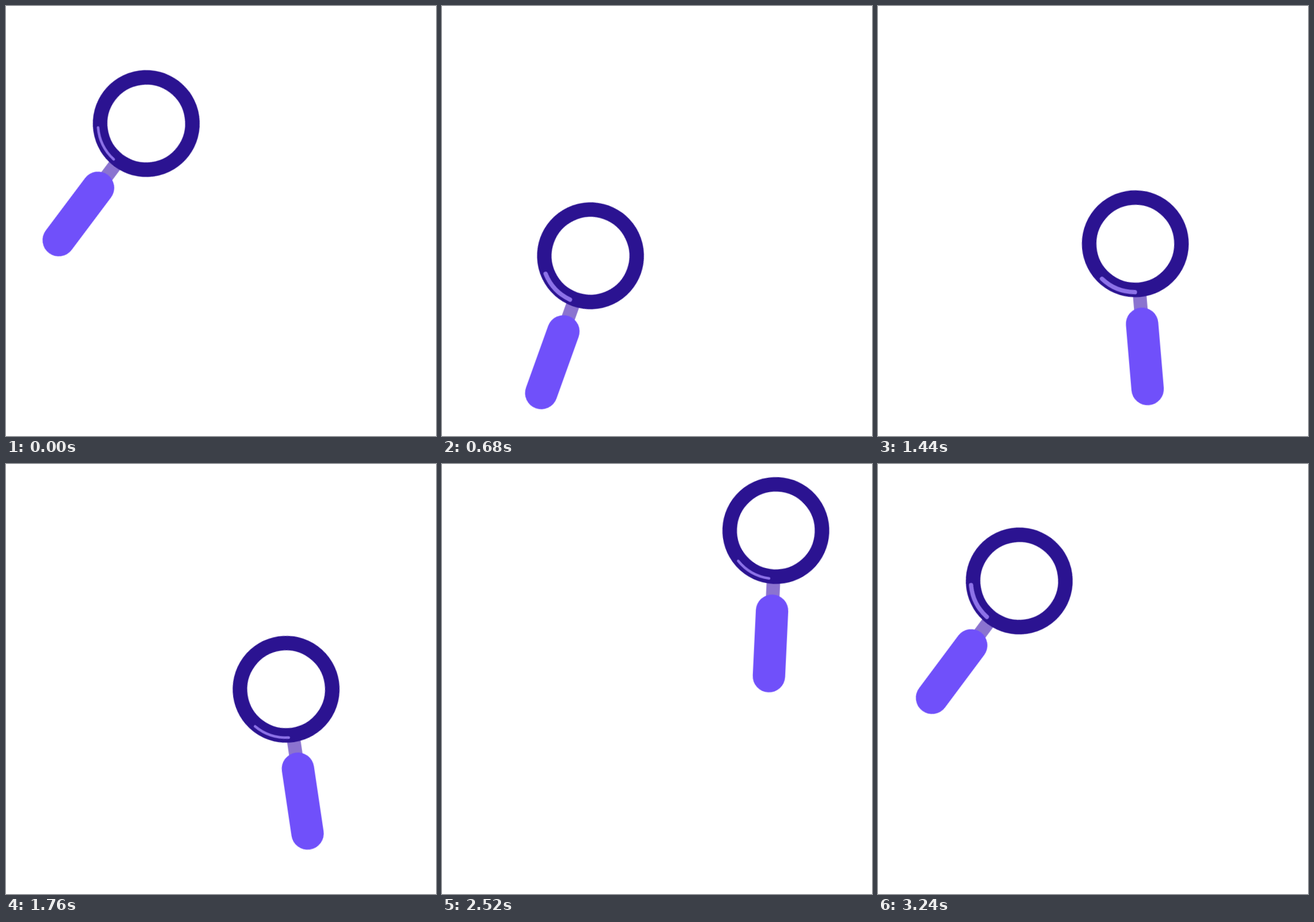
Animation of 748x748 px, one loop 3.32 s. Source, as an HTML page without scripts:

```html
<!DOCTYPE html>
<html lang="en">
<head>
<meta charset="utf-8">
<title>Magnifying glass</title>
<style>
  html, body { margin: 0; width: 100%; height: 100%; overflow: hidden; background: #fff; }
  svg { display: block; width: 100%; height: 100%; }

  /* The lens centre travels round four stops, with a short rest at each */
  .glass {
    offset-path: path("M244 204.5C234 287 244 371 262.5 454L482.5 406L581 115C469 145 356 137 244 204.5");
    offset-rotate: 0deg;
    animation: travel 3.32s cubic-bezier(.33, 0, .67, 1) infinite;
  }
  @keyframes travel {
    0%, 1.2% { offset-distance: 0%; animation-timing-function: cubic-bezier(.24, 0, .61, 1); }
    25.3%, 26.3% { offset-distance: 22.14%; }
    49.1%, 49.7% { offset-distance: 41.97%; }
    74.6%, 75.9% { offset-distance: 69.01%; }
    98.6%, 100% { offset-distance: 100%; }
  }

  /* The handle swings under the lens */
  .swing { animation: swing 3.32s linear infinite; }
  @keyframes swing {
    0%, 1.2% { transform: rotate(36.9deg); }
    26.3% { transform: rotate(14.6deg); animation-timing-function: cubic-bezier(.45, .38, .68, 1); }
    50.6% { transform: rotate(-8.8deg); animation-timing-function: cubic-bezier(.4, .1, .7, .5); }
    75.9% { transform: rotate(2.7deg); animation-timing-function: cubic-bezier(.33, .1, .67, 1); }
    98.6%, 100% { transform: rotate(36.9deg); }
  }

  .neck { fill: #8b73d0; }
  .handle { fill: #7050fa; }
  .ring { fill: none; stroke: #2b1391; stroke-width: 25.3; }
  .shine {
    fill: none; stroke: #8d72e8; stroke-linecap: round;
    animation: shine 3.32s step-end infinite;
  }
  @keyframes shine {
    0%, 53% { stroke-width: 4.4px; }
    2.4%, 86.7% { stroke-width: 7.4px; }
  }
</style>
</head>
<body>
<svg viewBox="0 0 748 748">
  <g class="glass">
    <g class="swing">
      <rect class="neck" x="-11.8" y="86" width="23.6" height="40"/>
      <rect class="handle" x="-28.2" y="111.5" width="56.4" height="170.3" rx="28.2"/>
      <circle class="ring" r="80.3"/>
      <path class="shine" d="M-7.8 83.8A84.2 84.2 0 0 1 -63 55.8"/>
    </g>
  </g>
</svg>
</body>
</html>
```
